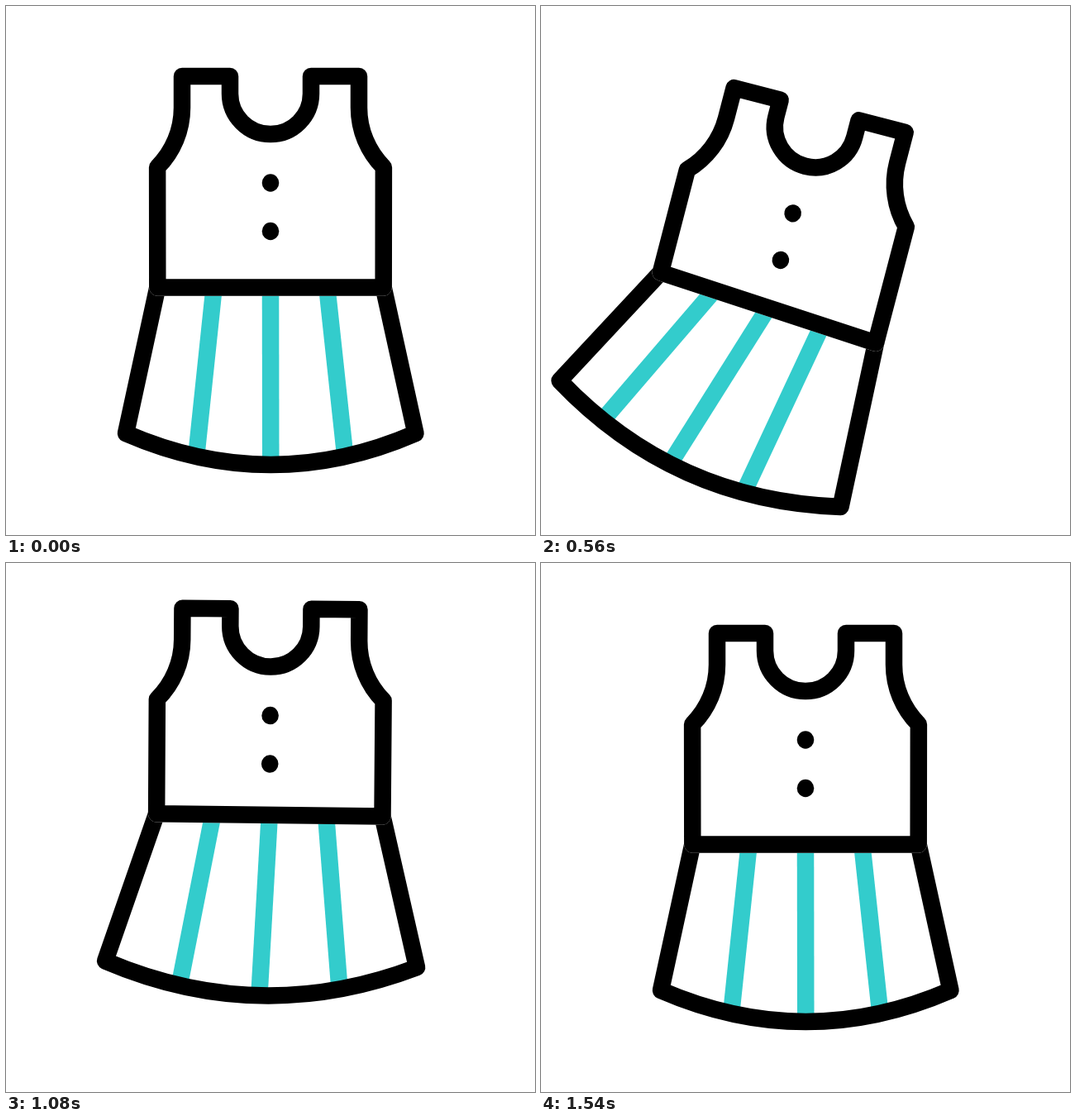
An HTML page with a canvas for the animation above (1800 ms loop, 640x640 px).

```html
<!DOCTYPE html>
<html lang="en">
<head>
<meta charset="utf-8">
<title>Swinging dress</title>
<style>
  html, body { margin: 0; width: 100%; height: 100%; overflow: hidden; background: #fff; }
  canvas { display: block; width: 100vw; height: 100vh; }
</style>
</head>
<body>
<canvas id="stage" width="640" height="640"></canvas>
<script>
const ctx = document.getElementById('stage').getContext('2d');
const LOOP = 1800, STEP = 20;
const BLACK = '#000', TEAL = '#33cccc', LINE = 20.5;
const PIVOT = { x: 320, y: 153 };

// Each key: [time in ms, ...values], eased in and out between keys.
// Swing: angle in degrees, waist lift left and right, hem offset left x, y and right x, y.
const SWING = [
  [0, 0, 0, 0, 0, 0, 0, 0],
  [567, 14.6, -17, 0, -47, -36, -30, 26],
  [900, -6.93, 0, -22, 15, 14, 52, -20.5],
  [1167, 2.8, -9, 0, -35, -11, -12, 7.5],
  [1367, -1.65, 0, -2, 3.7, 3, 2.5, -2],
  [1533, 0, 0, 0, 0, 0, 0, 0]
];
const BOUNCE = [[0, 0], [680, 42.3], [1090, -29.6], [1420, 0]];
const PLEAT_SHIFT = [[0, 0], [567, -0.063], [733, -0.068], [900, -0.015], [1167, 0]];

function sample(keys, time) {
  const next = keys.findIndex(key => key[0] > time);
  if (next < 0) return keys[keys.length - 1].slice(1);
  const a = keys[next - 1], b = keys[next];
  const u = (time - a[0]) / (b[0] - a[0]);
  const eased = u * u * (3 - 2 * u);
  return a.slice(1).map((value, i) => value + (b[i + 1] - value) * eased);
}

const mix = (a, b, t) => ({ x: a.x + (b.x - a.x) * t, y: a.y + (b.y - a.y) * t });

function stroke(color) {
  ctx.strokeStyle = color;
  ctx.stroke();
}

function drawSkirt(waistL, waistR, hemL, hemR, shift) {
  const middle = mix(hemL, hemR, 0.5);
  const dx = hemR.x - hemL.x, dy = hemR.y - hemL.y;
  const length = Math.hypot(dx, dy);
  const control = { x: middle.x - dy / length * 76, y: middle.y + dx / length * 76 };
  const onHem = t => mix(mix(hemL, control, t), mix(control, hemR, t), t);

  [[0.25, 0.243], [0.5, 0.5], [0.75, 0.757]].forEach(([top, bottom]) => {
    const from = mix(waistL, waistR, top), to = onHem(bottom + shift);
    ctx.beginPath();
    ctx.moveTo(from.x, from.y);
    ctx.lineTo(to.x, to.y);
    stroke(TEAL);
  });

  // The sides run a little way under the top.
  const startL = mix(hemL, waistL, 1.05), startR = mix(hemR, waistR, 1.05);
  ctx.beginPath();
  ctx.moveTo(startL.x, startL.y);
  ctx.lineTo(hemL.x, hemL.y);
  ctx.quadraticCurveTo(control.x, control.y, hemR.x, hemR.y);
  ctx.lineTo(startR.x, startR.y);
  stroke(BLACK);
}

function drawTop(waistL, waistR) {
  ctx.beginPath();
  ctx.moveTo(213, 85);
  ctx.lineTo(271, 85);
  ctx.arc(320, 106, 49, Math.PI, 0, true);
  ctx.lineTo(369, 85);
  ctx.lineTo(427, 85);
  ctx.arc(529, 123, 102, Math.PI, Math.PI * 0.75, true);
  ctx.lineTo(waistR.x, waistR.y);
  ctx.lineTo(waistL.x, waistL.y);
  ctx.arc(111, 123, 102, Math.PI / 4, 0, true);
  ctx.closePath();
  ctx.fillStyle = '#fff';
  ctx.fill();
  stroke('#fff'); // leaves the fine seam around the waist corners
  stroke(BLACK);

  ctx.fillStyle = BLACK;
  [214, 272.5].forEach(y => {
    ctx.beginPath();
    ctx.ellipse(320, y, 10.3, 10.7, 0, 0, Math.PI * 2);
    ctx.fill();
  });
}

function draw(time) {
  const [angle, liftL, liftR, leftX, leftY, rightX, rightY] = sample(SWING, time);
  const [drop] = sample(BOUNCE, time);
  const [shift] = sample(PLEAT_SHIFT, time);
  const waistL = { x: 183.3, y: 340.5 + liftL }, waistR = { x: 456.7, y: 340.5 + liftR };
  const hemL = { x: 145 + leftX, y: 517 + leftY }, hemR = { x: 495.5 + rightX, y: 517 + rightY };

  ctx.setTransform(1, 0, 0, 1, 0, 0);
  ctx.fillStyle = '#fff';
  ctx.fillRect(0, 0, 640, 640);
  ctx.translate(PIVOT.x, PIVOT.y + drop);
  ctx.rotate(angle * Math.PI / 180);
  ctx.translate(-PIVOT.x, -PIVOT.y);
  ctx.lineWidth = LINE;
  ctx.lineJoin = 'round';
  drawSkirt(waistL, waistR, hemL, hemR, shift);
  drawTop(waistL, waistR);
}

const start = performance.now();
function tick() {
  const time = (performance.now() - start) % LOOP;
  draw(Math.floor(time / STEP) * STEP);
  requestAnimationFrame(tick);
}
tick();
</script>
</body>
</html>
```
